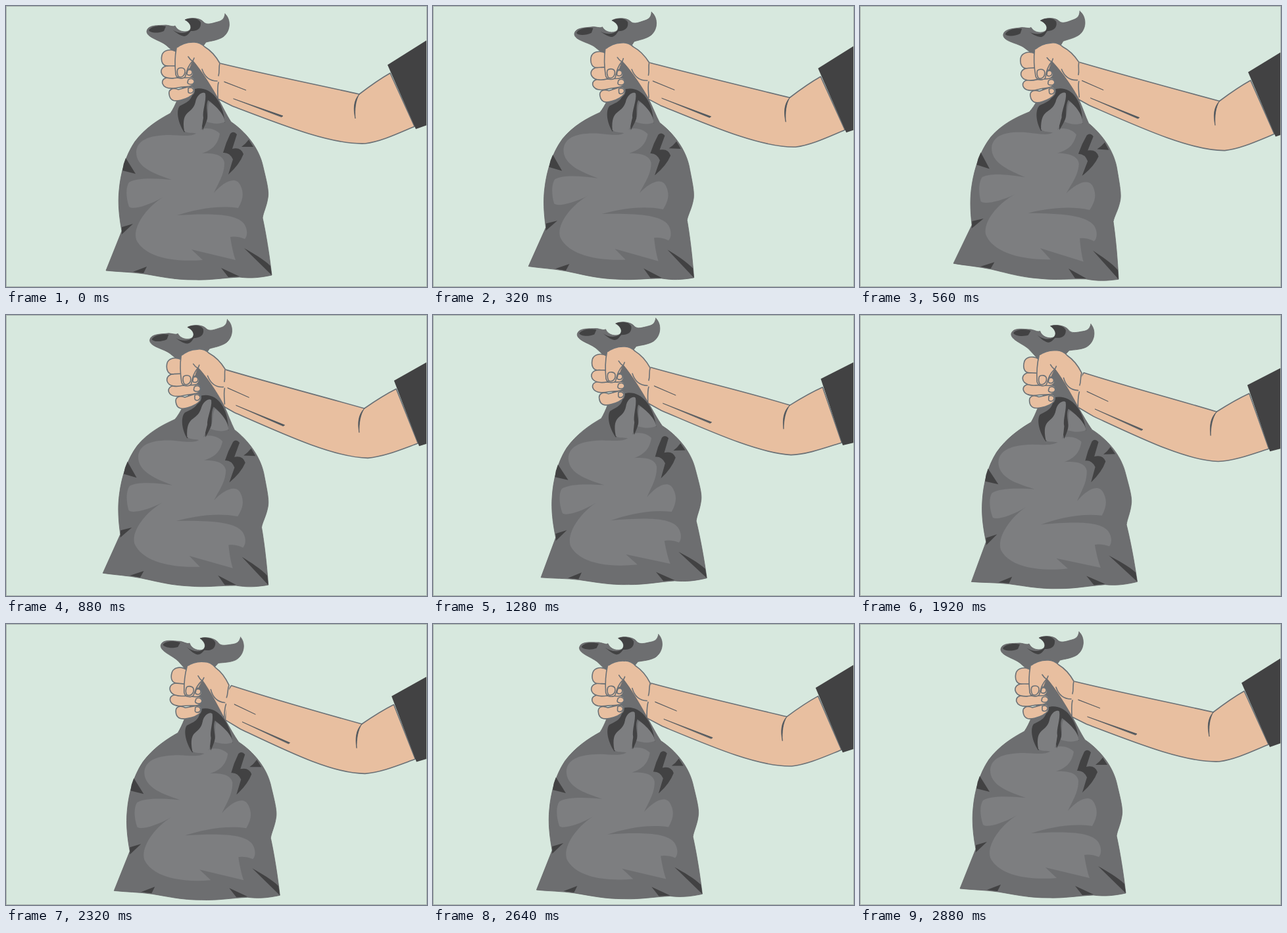
Write an HTML page that moves like this. It is 640 px wide and 427 px high and loops after 2960 ms.

```html
<!DOCTYPE html>
<html lang="en">
<head>
<meta charset="utf-8">
<title>Swinging bag</title>
<style>
  html, body { margin: 0; width: 100%; height: 100%; overflow: hidden; background: #d7e8de; }
  svg { display: block; width: 100%; height: 100%; }
  path { stroke-linejoin: round; stroke-linecap: round; }
  .skin { fill: #e8bfa0; }
  .line { stroke: #6a7075; stroke-width: 1.6; }
  .bare { fill: none; }
  .bag { fill: #6d6e70; }
  .light { fill: #7d7e80; }
  .dark { fill: #424243; }
  .ink { fill: #4d555c; stroke: #4d555c; stroke-width: .7; }
  .edge { stroke: #626365; stroke-width: .8; }
</style>
</head>
<body>
<svg viewBox="0 0 640 427">
  <rect width="640" height="427" fill="#d7e8de"/>

  <g data-part="tuft">
    <path class="bag edge" d="M333 12 C342 20 342 38 330 47 C322 52 312 53 304 55 L296 66 L262 76 L244 60 C235 52 213 48 214 38 C216 28 232 30 243 29 C251 30 254 32 257 30 C261 39 273 41 279 37 C284 31 278 24 272 21 C280 17 295 18 300 24 C305 30 314 26 322 24 C330 22 332 18 333 12 Z"/>
    <path class="dark" d="M217 37 C221 30 235 29 243 31 L240 38 C231 42 219 41 217 37 Z"/>
    <path class="dark" d="M253 36 C261 42 273 43 279 37 C284 31 278 24 272 21 C280 17 293 18 296 25 C297 34 291 38 281 38 C278 41 277 45 271 46 C264 45 258 40 253 36 Z"/>
  </g>

  <g data-part="arm">
    <path class="skin line" d="M325 87 C395 104 470 119 537 134 C554 121 568 111 584 102 L621 183 C595 194 570 206 546 209 C495 211 420 181 344 152 L320 140 L318 100 Z"/>
    <path class="ink" d="M332 115 L365 128 L332 115.5 Z"/>
    <path class="ink" d="M346 141 L421 167 L419 168.5 Z"/>
    <path class="ink" d="M537 134 C531 144 530 157 531 171 C528 157 528 144 537 134 Z"/>
  </g>
  <g data-part="upper">
    <path class="dark" d="M580 89.5 L700 14 L700 160 L623 187 Z"/>
  </g>

  <g data-part="hand">
    <path class="skin" d="M259 64 C266 58 276 55 284 55 C292 54 298 58 302 62 C312 68 320 78 326 87 L325 110 L323 141 L300 130 L262 112 Z"/>
    <path class="bare line" d="M259 64 C266 58 276 55 284 55 C292 54 298 58 302 62 C312 68 320 78 325 87 C323 94 325 100 323 106 M298 96 C302 108 310 114 321 114 M323 116 C321 124 322 132 322 140"/>
  </g>

  <g data-part="bag">
    <path class="bag edge" d="M284 83 C294 94 311 120 322 140 C330 154 335 165 342 176 C363 190 385 215 391 245 C397 270 400 282 398 292 C396 305 391 314 390 322 C395 345 400 375 404 409 C385 413 372 414 355 412 C330 413 310 417 285 416 C255 416 235 411 210 407 C190 404 170 404 152 402 L176 342 C172 320 170 300 172 280 C174 256 181 228 196 206 C211 186 231 173 250 163 C258 151 262 138 270 120 Z"/>
    <path class="light" d="M198 222 C199 205 215 196 250 196 C270 197 284 199 291 192 C300 182 318 186 325 194 C322 212 312 219 298 224 C315 223 330 226 332 238 C332 255 325 265 316 284 C330 268 350 256 357 274 C362 285 360 295 353 307 C320 302 285 310 260 318 C310 315 350 315 362 331 C368 340 367 350 363 354 C355 350 345 350 341 351 C343 365 346 378 349 386 L282 370 L299 386 C250 390 210 380 198 355 C192 335 215 305 238 291 C215 304 192 310 187 305 C182 290 182 275 187 268 C200 260 230 262 252 264 C225 255 198 245 198 222 Z"/>
    <path class="dark" d="M284 127 C306 119 329 138 333 178 C327 162 318 150 307 143 C303 152 307 164 306 171 C304 179 301 184 299 189 L296 168 L271 192 C260 175 259 158 264 152 C275 146 284 144 284 127 Z"/>
    <path class="light" d="M271 190 C266 156 283 166 288 146 C290 134 300 129 303 133 C305 144 298 160 300 170 C298 180 299 188 291 194 C284 192 276 194 271 190 Z"/>
    <path class="light" d="M309 146 C318 150 332 165 333 176 C322 181 313 178 305 176 C309 165 305 155 309 146 Z"/>
    <path class="dark" d="M341 194 Q346 189 351 195 L344 217 Q357 214 361 225 Q355 241 338 256 L345 233 Q340 222 330 223 Q334 208 341 194 Z"/>
    <path class="dark" d="M369 203 L376 214 L358 214 Q364 210 369 203 Z"/>
    <path class="dark" d="M182 231 L197 255 L177 250 Q178 240 182 231 Z"/>
    <path class="dark" d="M176 336 L193 331 L176 347 Z"/>
    <path class="dark" d="M193 404 L214 396 L209 406 Z"/>
    <path class="dark" d="M327 398 L355 411 L338 412 Z"/>
    <path class="dark" d="M362 368 C376 376 392 385 402 395 L404 409 Z"/>
  </g>

  <g data-part="hand">
    <path class="skin line" d="M262 127 C252 123 247 128 248 134 C249 143 255 146 266 143 C274 141 281 138 285 133 C288 127 286 122 280 122 Z"/>
    <path class="skin line" d="M258 109 C244 106 236 111 238 118 C241 126 252 126 262 124 C272 122 280 124 285 119 C289 113 286 108 279 108 Z"/>
    <path class="skin line" d="M258 91 C242 88 235 94 236 101 C238 110 250 111 260 109 L276 109 C283 109 286 104 284 99 C282 95 277 95 272 97 Z"/>
    <path class="skin line" d="M260 70 C250 64 239 67 237 75 C235 84 238 92 247 91 L262 91 Z"/>
    <path class="skin" d="M259 64 C256 80 257 95 258 104 C260 112 272 111 273 106 C275 98 276 92 284 83 L290 60 L270 60 Z"/>
    <path class="bare line" d="M259 64 C256 80 257 95 258 104 C260 112 272 111 273 106 C275 98 276 92 284 83 M277 77 Q280 82 284 84 L286 79"/>
    <path class="skin line" d="M261 96 C263 93 271 93 272 98 C273 105 267 110 262 107 C260 103 260 99 261 96 Z"/>
    <path class="skin line" d="M276 98 C280 95 284 98 283 102 C282 106 276 106 275 103 Z"/>
    <path class="skin line" d="M277 112 C282 108 287 112 286 116 C284 121 276 119 276 116 Z"/>
    <path class="skin line" d="M277 125 C282 122 286 126 285 129 C283 134 277 133 277 130 Z"/>
  </g>

  <rect x=".5" y=".5" width="639" height="426" fill="none" stroke="#a7b1ac"/>
</svg>
<script>
  const STEP = 80, LOOP = 2960, CYCLE = 2880;
  const times = [0, 560, 880, 1280, 1920, 2320];

  // Each pose is [dx, dy, degrees] around the pivot, one per key time.
  const joints = {
    tuft:    { pivot: [273.5, 25], poses: [[0, 0, 0], [2.5, 1, -4.9], [4, -2.5, -2.5], [5.5, -8, 1], [17, -4, 5.7], [22.5, 1, 6.8]] },
    hand:    { pivot: [285, 100], poses: [[0, 0, 0], [8.7, 1, -3.8], [8.7, -3, -2.5], [5, -7, .5], [11.3, -1.2, 3], [13, 2.4, 5]] },
    forearm: { pivot: [364, 132], poses: [[0, 0, 0], [5, -.3, 2.5], [4.3, -2.7, 2.9], [4, -6, 2.2], [12, 3.3, 4], [14, 9.3, 4.4]] },
    upper:   { pivot: [538, 170], poses: [[0, 0, 0], [9, 10.5, .7], [6, 8, 2.8], [2, 3, 5.5], [2, 13, 5], [2, 18, 3]] },
    sack:    { pivot: [299, 329], poses: [[0, 0, 0], [-5.3, -.7, 3.9], [-1.7, -3.3, 2.5], [10.3, -6.7, -1.4], [15.3, -.7, -1.6], [12.3, 3.3, 0]] }
  };

  const count = times.length;
  const wrap = i => (i + count) % count;
  const timeAt = i => times[wrap(i)] + CYCLE * Math.floor(i / count);

  // Periodic cubic through the poses.
  function poseAt(poses, t) {
    let i = count - 1;
    while (times[i] > t) i--;
    const span = timeAt(i + 1) - timeAt(i), u = (t - timeAt(i)) / span;
    return [0, 1, 2].map(k => {
      const value = j => poses[wrap(j) % count][k];
      const slope = j => (value(j + 1) - value(j - 1)) / (timeAt(j + 1) - timeAt(j - 1)) * span;
      const a = value(i), b = value(i + 1), m = slope(i), n = slope(i + 1);
      return a + u * (m + u * (3 * (b - a) - 2 * m - n + u * (2 * (a - b) + m + n)));
    });
  }

  function mover({ pivot: [px, py], poses }, t) {
    const [dx, dy, deg] = poseAt(poses, t);
    const c = Math.cos(deg * Math.PI / 180), s = Math.sin(deg * Math.PI / 180);
    return (x, y) => [px + dx + c * (x - px) - s * (y - py), py + dy + s * (x - px) + c * (y - py)];
  }

  function smooth(from, to, v) {
    const u = Math.min(1, Math.max(0, (v - from) / (to - from)));
    return u * u * (3 - 2 * u);
  }

  const blend = (f, g, weight) => (x, y) => {
    const a = f(x, y), b = g(x, y), w = weight(x, y);
    return [a[0] + (b[0] - a[0]) * w, a[1] + (b[1] - a[1]) * w];
  };

  const paths = [...document.querySelectorAll('[data-part] path')].map(el => ({
    el, part: el.parentNode.dataset.part, shape: el.getAttribute('d')
  }));

  function draw(t) {
    const [tuft, hand, forearm, upper, sack] =
      ['tuft', 'hand', 'forearm', 'upper', 'sack'].map(name => mover(joints[name], t));
    const warps = {
      tuft, hand, upper,
      arm: blend(forearm, upper, x => smooth(400, 540, x)),
      bag: blend(hand, sack, (x, y) => smooth(100, 190, y))
    };
    for (const { el, part, shape } of paths) {
      el.setAttribute('d', shape.replace(/([\d.]+) ([\d.]+)/g,
        (_, x, y) => warps[part](+x, +y).map(v => v.toFixed(2)).join(' ')));
    }
  }

  let shown = -1;
  function tick() {
    const step = Math.floor(performance.now() % LOOP / STEP);
    if (step !== shown) draw(step * STEP % CYCLE);
    shown = step;
    requestAnimationFrame(tick);
  }
  tick();
</script>
</body>
</html>
```
